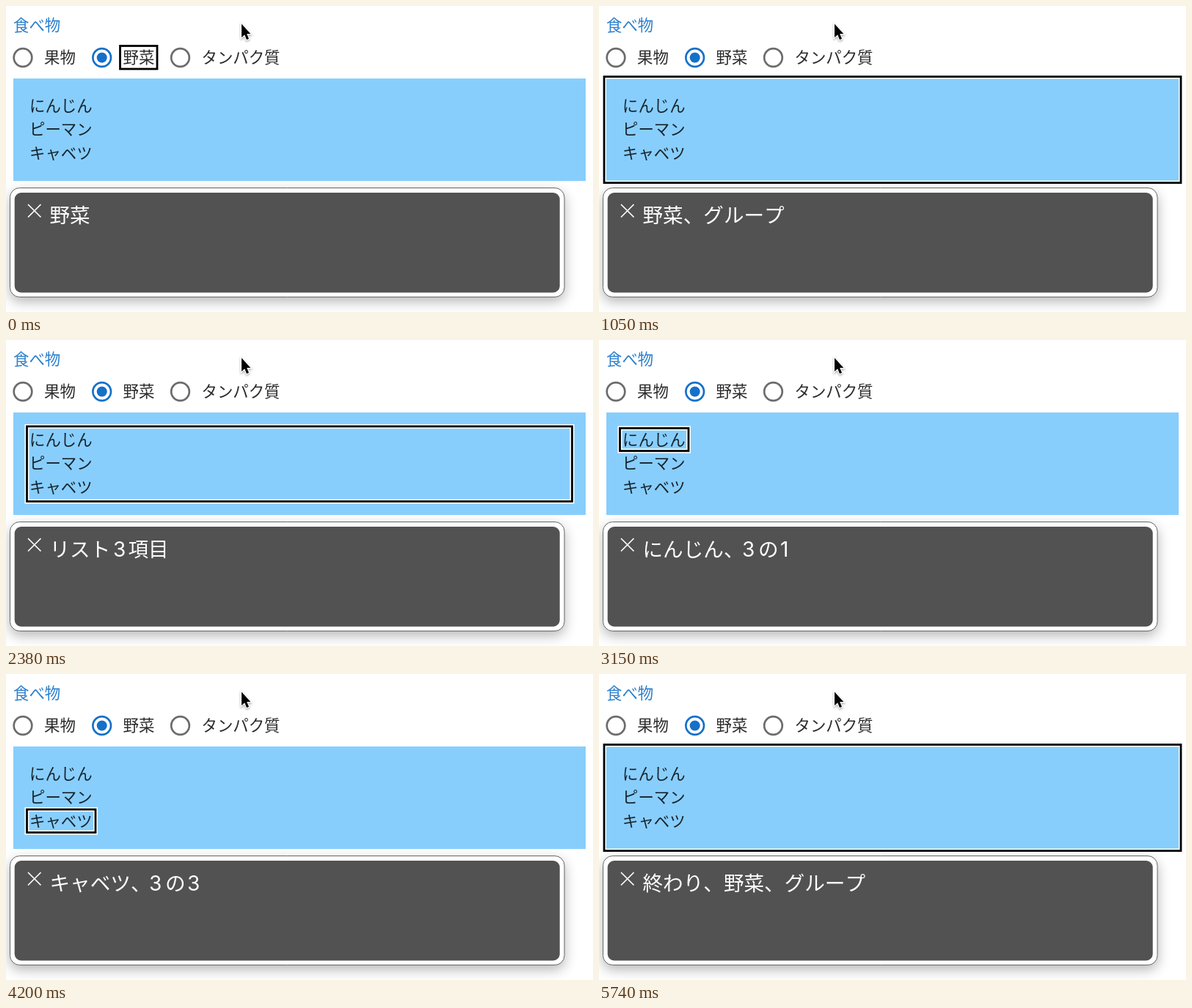
An HTML page with a canvas for the animation above (5.81 s loop, 800x418 px).

```html
<!DOCTYPE html>
<html lang="ja">
<head>
<meta charset="utf-8">
<style>
html, body { margin: 0; width: 100%; height: 100%; overflow: hidden; background: #fff; }
canvas { display: block; }
</style>
</head>
<body>
<canvas id="stage" width="800" height="418"></canvas>
<script>
const ctx = document.getElementById('stage').getContext('2d');
const LOOP = 5810;
const JP = '"Noto Sans CJK JP", "Noto Sans CJK", sans-serif';
const CAPTION = 27.6;

const group = [7, 96.5, 793, 241.5];
const list = [28.5, 118, 771.5, 220.5];

// start time, focus ring (left, top, right, bottom), caption pieces (text, x)
const steps = [
  { at: 0, ring: [155.5, 54.5, 206, 86], caption: [['野菜', 59.5]] },
  { at: 1050, ring: group, caption: [['野菜、グループ', 59.5]] },
  { at: 2380, ring: list, caption: [['リスト', 59.5], ['3', 146], ['項目', 166.5]] },
  { at: 3150, ring: [28.5, 120.5, 122, 151.5], caption: itemCaption('にんじん', 1) },
  { at: 3710, ring: [28.5, 152.5, 119, 184], caption: itemCaption('ピーマン', 2) },
  { at: 4130, ring: [28.5, 185, 122, 216.5], caption: itemCaption('キャベツ', 3) },
  { at: 4690, ring: list, caption: [['リストの終わり', 59.5]] },
  { at: 5180, ring: group, caption: [['終わり、野菜、グループ', 59.5]] }
];

function itemCaption(name, n) {
  return [[name + '、', 59.5], ['3', 195], ['の', 217], [String(n), 247]];
}

function text(str, x, y, color, font) {
  ctx.font = font;
  ctx.fillStyle = color;
  ctx.fillText(str, x, y);
}

function label(str, x, y, color = '#2b2b2b') {
  text(str, x, y, color, `350 21.4px ${JP}`);
}

function radio(x, checked) {
  ctx.strokeStyle = checked ? '#1570c9' : '#6c6c6c';
  ctx.lineWidth = 2.7;
  ctx.beginPath();
  ctx.arc(x, 70.5, 12.3, 0, Math.PI * 2);
  ctx.stroke();
  if (!checked) return;
  ctx.fillStyle = '#1570c9';
  ctx.beginPath();
  ctx.arc(x, 70.5, 7, 0, Math.PI * 2);
  ctx.fill();
}

function roundBox(x, y, w, h, r) {
  ctx.beginPath();
  ctx.roundRect(x, y, w, h, r);
}

function drawPage() {
  ctx.fillStyle = '#fff';
  ctx.fillRect(0, 0, 800, 418);
  label('食べ物', 10, 34, '#2b7fcb');
  radio(23, false);
  label('果物', 52, 78);
  radio(130.7, true);
  label('野菜', 159.5, 78);
  radio(237.5, false);
  label('タンパク質', 266.5, 78);
}

function drawList() {
  ['にんじん', 'ピーマン', 'キャベツ'].forEach((name, i) =>
    label(name, 32, 143.7 + i * 32.4, '#16242e'));
}

function drawPanel() {
  ctx.save();
  ctx.shadowColor = 'rgba(0,0,0,.3)';
  ctx.shadowBlur = 17;
  ctx.shadowOffsetY = 6;
  ctx.fillStyle = '#fff';
  roundBox(5.5, 248.5, 755.5, 149, 13);
  ctx.fill();
  ctx.restore();
  ctx.strokeStyle = '#666';
  ctx.lineWidth = 1;
  ctx.stroke();
  ctx.fillStyle = '#525252';
  roundBox(11.7, 255, 743, 136.5, 9);
  ctx.fill();
  ctx.strokeStyle = '#fff';
  ctx.lineWidth = 1.7;
  ctx.beginPath();
  ctx.moveTo(30, 271);
  ctx.lineTo(47.5, 288.5);
  ctx.moveTo(47.5, 271);
  ctx.lineTo(30, 288.5);
  ctx.stroke();
}

function drawRing([l, t, r, b]) {
  for (const [color, width] of [['#fff', 6], ['#000', 2.8]]) {
    ctx.strokeStyle = color;
    ctx.lineWidth = width;
    ctx.strokeRect(l, t, r - l, b - t);
  }
}

function drawCaption(pieces) {
  for (const [str, x] of pieces) {
    const font = /\d/.test(str) ? '400 28px Inter, sans-serif' : `400 ${CAPTION}px ${JP}`;
    text(str, x, 296, '#fff', font);
  }
}

function drawPointer() {
  const arrow = new Path2D('M321 24.5V43l4.2-3.8 2.8 6.8 3-1.3-2.8-6.6h5.2z');
  ctx.save();
  ctx.shadowColor = 'rgba(0,0,0,.35)';
  ctx.shadowBlur = 3;
  ctx.shadowOffsetY = 1.5;
  ctx.strokeStyle = '#fff';
  ctx.lineWidth = 2.4;
  ctx.stroke(arrow);
  ctx.restore();
  ctx.fillStyle = '#000';
  ctx.fill(arrow);
}

function frame(now) {
  const t = now % LOOP;
  const step = steps.findLast(s => s.at <= t);
  ctx.fontKerning = 'none';
  drawPage();
  drawPanel();
  ctx.fillStyle = '#88cefc';
  ctx.fillRect(10, 99, 780, 140);
  drawRing(step.ring);
  // the ring lies around the text, never over it
  drawList();
  drawCaption(step.caption);
  drawPointer();
}

const start = performance.now();
function tick() {
  frame(performance.now() - start);
  requestAnimationFrame(tick);
}
tick();
</script>
</body>
</html>
```
